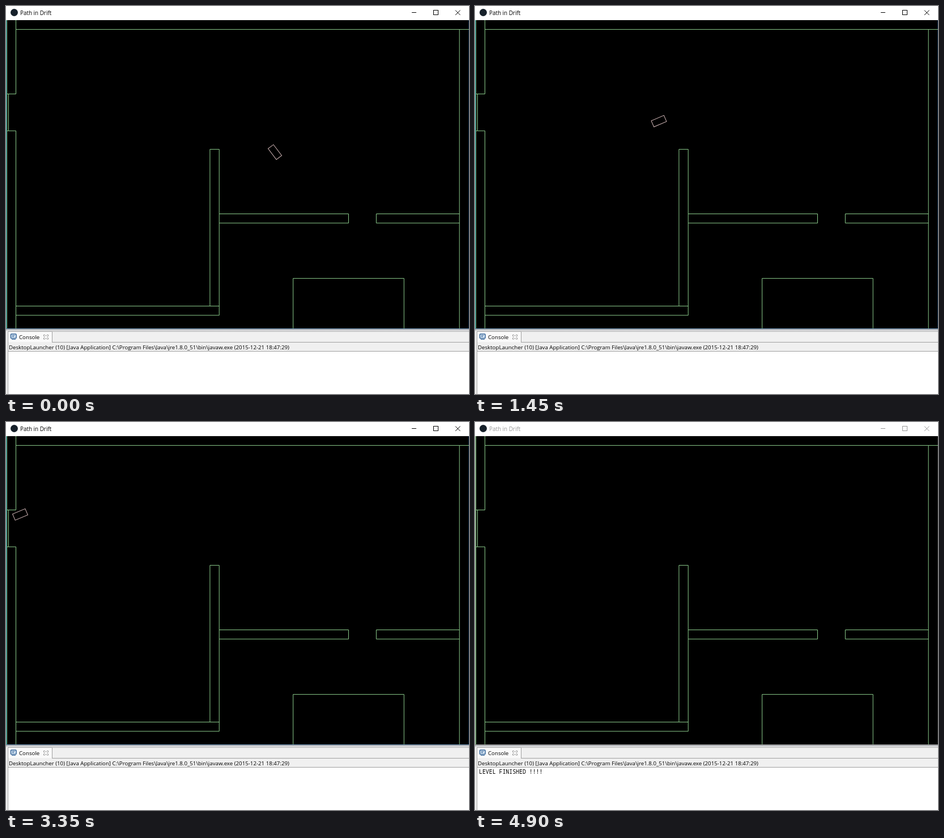
An HTML page for the animation above (4950 ms loop, 817 by 686 pixels).

```html
<!DOCTYPE html>
<html lang="en">
<head>
<meta charset="utf-8">
<title>Path in Drift</title>
<style>
  html, body { margin: 0; width: 100%; height: 100%; overflow: hidden; background: #fff; }
  svg { display: block; width: 817px; height: 686px; }
  text { font-family: "Open Sans", "Noto Sans", sans-serif; font-size: 9.7px; fill: #000; white-space: pre; }
  #caption { font-size: 9.9px; }
  #log { font-family: "Noto Sans Mono", "DejaVu Sans Mono", monospace; font-size: 9.87px; }
  .walls { fill: none; stroke: #8ccc8c; }
  .walls path { vector-effect: non-scaling-stroke; }
  .buttons { fill: none; stroke: #000; }
  #ship { fill: none; stroke: #ccb2b2; }
  .side { fill: #2583a6; }
  .lower { fill: #5f86a8; }
  .far { fill: #14304c; }
  .idle #caption { fill: #999; }
  .idle .buttons { stroke: #999; }
  .idle .side { fill: #8a9a8a; }
  .idle .lower { fill: #8c8c8c; }
  .idle .far { fill: #303030; }
</style>
</head>
<body>
<svg id="stage" viewBox="0 0 817 686">
  <defs>
    <linearGradient id="shade" x2="0" y2="1">
      <stop stop-color="#a0a2a8"/><stop offset="1" stop-color="#f0f0f0"/>
    </linearGradient>
    <clipPath id="room"><rect x="1" y="25" width="816" height="545"/></clipPath>
  </defs>

  <!-- title bar -->
  <rect width="817" height="686" fill="#fff"/>
  <circle cx="14.5" cy="11.5" r="6.5" fill="#16202a"/>
  <text id="caption" x="25" y="15.5">Path in Drift</text>
  <g class="buttons">
    <path d="M716 11.5h8M754.5 7.5h8v8h-8z" shape-rendering="crispEdges"/>
    <path d="M793 7.5l8.5 8.5M801.5 7.5l-8.5 8.5"/>
  </g>

  <!-- room, walls in tile units -->
  <rect y="25" width="817" height="545" fill="#000"/>
  <rect class="side" y="25" width="1" height="545"/>
  <rect class="far" x="816" y="25" width="1" height="545"/>
  <g clip-path="url(#room)">
    <g class="walls" transform="translate(17.5 41.4) scale(16.305)">
      <path d="M-.98-2V34M0-2V7H-1M-.8 7V11M-1 11H0V34
        M0 0H50M48 0V34
        M21 30V13H22V31M0 30H22M0 31H22
        M22 20H36V21H22M48 20H39V21H48
        M30 34V27H42V34"/>
    </g>
    <rect id="ship" x="-12.1" y="-5.9" width="24.2" height="11.8"/>
  </g>

  <!-- console -->
  <rect class="lower" y="570" width="817" height="1"/>
  <rect y="571" width="817" height="4" fill="url(#shade)"/>
  <rect y="575" width="817" height="35" fill="#f0f0f0"/>
  <rect y="575" width="3" height="111" fill="#f0f0f0"/>
  <path d="M3.5 594V575.5H81.5V594" fill="#fafafa" stroke="#a0a0a0"/>
  <path d="M81 594.5H817M3 610.5H817M3.5 575V686" fill="none" stroke="#a0a0a0" shape-rendering="crispEdges"/>
  <path d="M81 575.5H817" stroke="#b4b4b4" shape-rendering="crispEdges"/>
  <rect x="8.5" y="580" width="9.5" height="7.5" rx="1" fill="#e4f0fb" stroke="#2d5f95" stroke-width="1.5"/>
  <path d="M10.5 582.5h5M10.5 584.5h4M10 589.5h7" stroke="#2d5f95"/>
  <text x="23" y="589">Console</text>
  <path d="M66.5 581.5h2l2 2 2-2h2v2l-2 1.7 2 1.8v2h-2l-2-2-2 2h-2v-2l2-1.8-2-1.7z" fill="#fff" stroke="#777" stroke-width=".8"/>
  <text x="5" y="607">DesktopLauncher (10) [Java Application] C:\Program Files\Java\jre1.8.0_51\bin\javaw.exe (2015-12-21 18:47:29)</text>
  <text id="log" x="7" y="621.8">LEVEL FINISHED !!!!</text>
</svg>
<script>
  const LOOP = 4950, STEP = 50;
  const FINISHED = 3450, SHIP_GONE = 3750, UNFOCUSED = 4850;

  // time (ms), x, y, velocity x, velocity y (px per second)
  const path = [
    [0, 474.5, 258.3, -50, -46],
    [650, 425.4, 231, -98, -38],
    [1450, 324.5, 203.6, -142, -32],
    [2200, 210.2, 181, -158, -25],
    [3350, 25, 163.5, -162, -8],
    [3750, -32, 167, -125, 10]
  ];
  // time (ms), degrees
  const turns = [[0, 53], [500, -23], [3400, -23], [3750, -6]];

  const get = id => document.getElementById(id);
  const stage = get("stage"), ship = get("ship"), log = get("log");

  function segment(keys, t) {
    let i = 0;
    while (i < keys.length - 2 && t >= keys[i + 1][0]) i++;
    const [a, b] = [keys[i], keys[i + 1]];
    const span = b[0] - a[0];
    return { a, b, span, u: Math.min(1, (t - a[0]) / span) };
  }

  // cubic through the points with the given velocities
  function place(t) {
    const { a, b, span, u } = segment(path, t);
    const s = span / 1000, v = 1 - u;
    return [1, 2].map(k =>
      a[k] * (1 + 2 * u) * v * v + a[k + 2] * s * u * v * v +
      b[k] * u * u * (3 - 2 * u) - b[k + 2] * s * u * u * v);
  }

  function heading(t) {
    const { a, b, u } = segment(turns, t);
    return a[1] + (b[1] - a[1]) * u;
  }

  function draw(now) {
    const t = Math.floor((now % LOOP) / STEP) * STEP;
    const [x, y] = place(t);
    ship.setAttribute("transform", `translate(${x} ${y}) rotate(${heading(t)})`);
    ship.style.visibility = t < SHIP_GONE ? "visible" : "hidden";
    log.style.visibility = t >= FINISHED ? "visible" : "hidden";
    stage.classList.toggle("idle", t >= UNFOCUSED);
  }

  const start = performance.now();
  function tick() {
    draw(performance.now() - start);
    requestAnimationFrame(tick);
  }
  tick();
</script>
</body>
</html>
```
